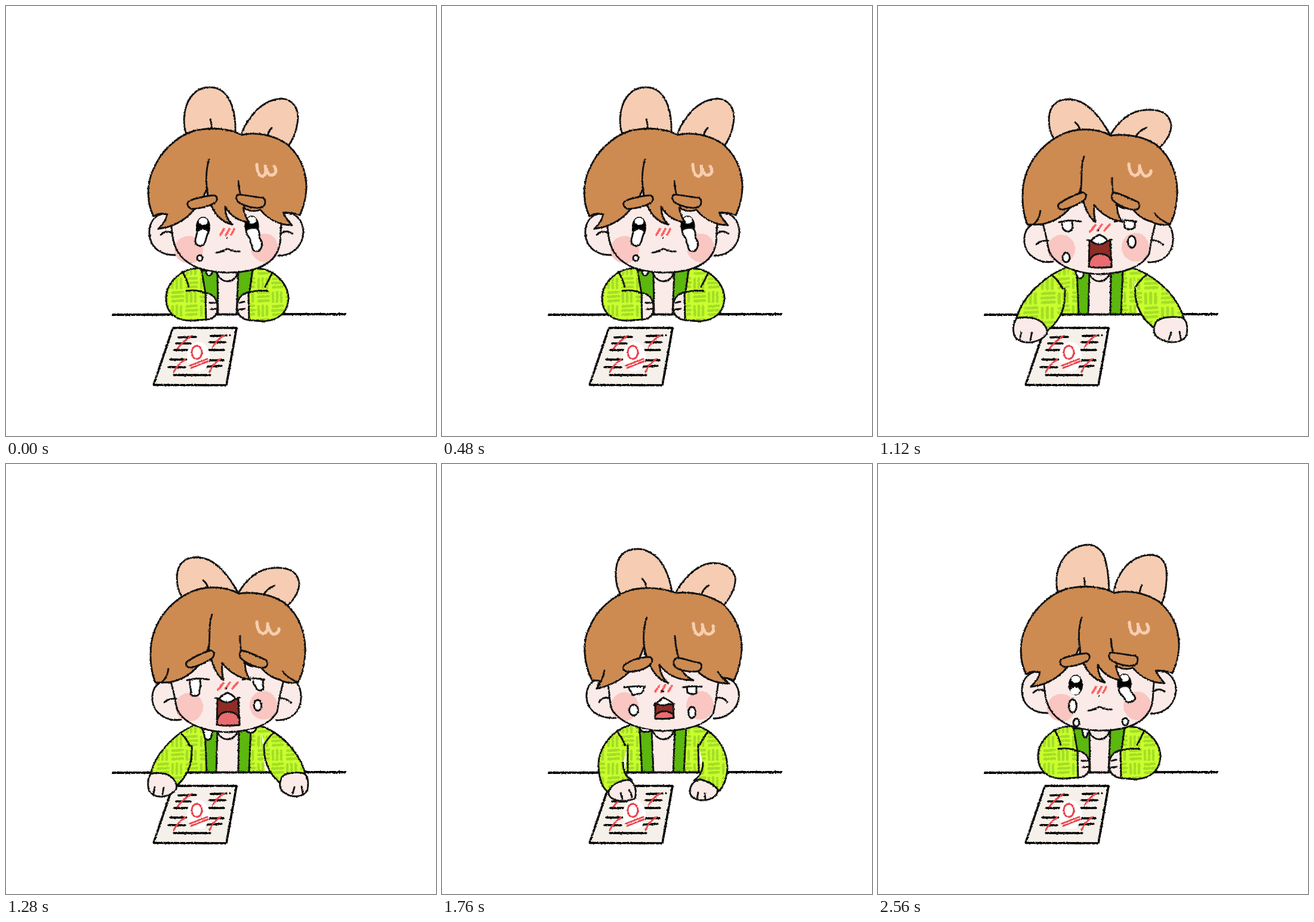
These frames come from a looping animation (720 by 720 pixels, 2.72 s). An HTML page:

```html
<!DOCTYPE html>
<html lang="en">
<head>
<meta charset="utf-8">
<title>Crying over a test</title>
<style>
html, body { margin: 0; width: 100%; height: 100%; overflow: hidden; background: #fff; }
svg { display: block; width: 100vw; height: 100vh; }
path, ellipse { vector-effect: non-scaling-stroke; stroke-linecap: round; stroke-linejoin: round; }
</style>
</head>
<body>
<svg id="stage" viewBox="0 0 720 720">
  <defs>
    <filter id="rough" filterUnits="userSpaceOnUse" x="0" y="0" width="720" height="720" color-interpolation-filters="sRGB">
      <feTurbulence type="fractalNoise" baseFrequency=".45" numOctaves="1" seed="4"/>
      <feDisplacementMap in="SourceGraphic" scale="3.2" xChannelSelector="R" yChannelSelector="G"/>
    </filter>
    <pattern id="weave" patternUnits="userSpaceOnUse" x="275" y="430" width="48" height="46">
      <rect width="48" height="46" fill="#caff2e"/>
      <path fill="none" stroke="#a3de26" stroke-width="4.4" d="M4 4l17-1M3 11l18-1M4 18l17-1M28 4v15M35 3v16M42 4v15M4 27v15M11 26v16M18 27v15M28 27l16-1M27 34l18-1M28 41l16-1"/>
    </pattern>
  </defs>
</svg>
<script>
const INK = '#111', SKIN = '#faebe8', HAIR = '#cd8b52', EAR = '#f6cdb3', BLUSH = '#f9c6c2',
      LAPEL = '#5cb70e', RED = '#e8434a', NOSE = '#ff5f60', WEAVE = 'url(#weave)';
const STEP = 160, ORDER = 'AEFACDGHDGHCAEFAE';

const path = (d, fill = 'none', stroke = INK, width = 2.9) =>
  `<path d="${d}" fill="${fill}" stroke="${stroke}" stroke-width="${width}"/>`;
const oval = (x, y, rx, ry, fill = '#fff', stroke = 'none', width = 2.9) =>
  `<ellipse cx="${x}" cy="${y}" rx="${rx}" ry="${ry}" fill="${fill}" stroke="${stroke}" stroke-width="${width}"/>`;
const drop = (x, y, rx, ry) => oval(x, y, rx, ry, '#fff', INK);
const group = (content, attrs = '') => `<g ${attrs}>${content}</g>`;
const lines = list => list.map(d => path(d)).join('');
const slashes = d => path(d, 'none', NOSE, 3.6);

const scenery =
  path('M179 517L568 515.8', 'none', '#000', 3.8) +
  path('M279.5 539L386 539 369 635 247 634.5Z', '#f5f0e9', '#000', 3.6) +
  path('M289 555L318 554M285 565L309 565M282 576L303 576M343 552.5L369 552M341 563L367 563M335 576L365 576M275 592L302 592M272 604.5L300 605M337 593.5L364 593M333 604L361 602.5M281 618L342 618M375 551v.1', 'none', '#000', 3.6) +
  oval(322, 587, 19, 25) +
  oval(319.5, 580, 8.5, 11, 'none', RED) +
  path('M308 602L337 591M310 606L338 595M287 574Q297 561 309 553M346 571Q355 557 366 551M281 613Q289 598 300 592M341 613Q345 600 359 591', 'none', RED);

const rabbitEars = (left, right, inner) => path(left, EAR) + path(right, EAR) + path(inner);

const ears = {
  A: rabbitEars('M302 215C297 200 297 183 302 167C309 147 323 136 341 136C359 136 371 147 378 166Q385 186 384 211',
    'M395 213C399 200 410 184 421 173C433 162 447 156 461 155C478 156 488 168 489 185Q488 212 473 234',
    'M342 190Q345 198 344 206M445 204Q440 209 438 217'),
  E: rabbitEars('M301 215C297 198 299 180 306 165C316 147 332 136 352 135C366 136 377 146 380 158Q386 180 387 211',
    'M395 213C398 195 408 178 418 168C430 157 445 152 457 152C474 153 481 163 483 178Q485 208 475 235',
    'M345 191Q347 198 346 206M442 203Q439 208 438 216'),
  C: rabbitEars('M299 218C291 205 289 185 293 167C298 149 311 142 328 142C345 143 361 154 370 169Q381 188 385 214',
    'M392 214C400 200 412 186 424 177C436 168 448 165 459 166C475 167 487 175 491 190Q493 210 472 237',
    'M335 192Q342 199 342 207M447 203Q438 208 435 217'),
  D: rabbitEars('M293 220C286 206 284 188 289 174C294 162 305 156 320 156C337 157 353 167 365 181Q376 193 389 216',
    'M389 216C396 204 408 190 421 182C434 175 447 173 460 174C478 175 489 184 491 200Q491 217 472 237',
    'M330 195Q337 200 338 208M449 204Q438 208 433 217')
};
ears.F = group(ears.E, 'transform="translate(-2 -2.5)"');

function head(p) {
  // Fills reach under the fringe so that no gap opens behind it.
  const sideEar = d => path(d + 'L370 385Z', SKIN, 'none') + path(d);
  return p.sideEars.map(sideEar).join('') +
    path(p.face + 'L450 300L300 300Z', SKIN, 'none') +
    p.blushes.map(b => oval(...b, BLUSH)).join('') +
    path(p.face) + path(p.folds) + p.eyes + path(p.hair, HAIR) + path(p.strands) +
    path(p.shine, 'none', '#f8ceb0', 5) + p.brows.map(d => path(d, HAIR)).join('');
}

const sadEye = (x, y) => oval(x, y, 12, 17, '#000') + oval(x, y - 9.5, 7.5, 6);
const sadLook = {
  sideEars: ['M270 349C253 345 239 360 240 381C241 405 260 418 285 417', 'M456 418C480 418 497 402 498 378C497 358 484 344 466 347'],
  face: 'M277 365C278 405 290 424 318 437C345 448 385 449 415 441C440 433 456 420 459 395L461 362',
  blushes: [[306, 408, 24, 23], [433, 405, 23, 24]],
  folds: 'M259 383Q267 375 279 380M479 381Q470 374 460 381',
  eyes: sadEye(330, 370) + sadEye(411.5, 368),
  hair: 'M247 352C236 330 235 300 246 275C258 245 285 218 315 209C345 202 375 205 394 216C420 210 450 217 470 231C492 250 503 275 503 305C502 325 497 340 492 350Q478 345 464 346Q470 358 479 367C458 367 438 357 426 341C414 346 405 342 397 338Q400 353 407 362Q380 359 367 336Q367 355 379 366Q350 360 338 319L337 305C325 335 300 368 255 373Q267 362 270 349Q258 345 247 352Z',
  strands: 'M340 257C334 275 335 300 338 320M389 293C390 311 394 325 400 340',
  shine: 'M420 265Q421 285 429 285Q437 284 434 268Q438 285 446 283Q456 280 449 268',
  brows: ['M306 327C315 322 335 318 347 317C355 318 355 326 349 330C338 336 325 339 312 340C304 338 302 331 306 327Z',
    'M388 316C395 315 415 320 430 321C436 324 435 335 428 337C415 340 400 335 390 329C384 324 385 319 388 316Z']
};
const sadMouth = slashes('M359 383L365 373M368 384L374 373M377 383L382 374') +
  oval(370, 388, 1.2, 1.2, INK) + path('M352 413Q362 412 371 406Q380 412 391 411');
const sadTears = {
  A: path('M320 378C326 370 338 372 339 380C335 384 336 390 333 396C330 404 318 403 317 394C316 388 320 386 320 378Z', '#fff') +
    path('M402 376C405 371 421 369 423 376C427 383 421 386 427 392C431 400 427 411 419 411C410 410 414 401 409 395C411 388 402 385 402 376Z', '#fff') +
    drop(324.5, 422, 4.5, 4.8) + path('M335 444Q336 452 341 451Q345 450 345 445', '#fff'),
  E: oval(330, 380, 8, 6.5) +
    path('M403 377C407 370 421 370 422 377C423 383 429 385 431 392C429 399 416 401 414 395C413 390 403 385 403 377Z', '#fff') +
    drop(326, 405, 6.5, 11) + drop(332, 433, 5, 6.5) + drop(414, 431.5, 5, 6) +
    path('M341 444C344 449 342 458 347 458C352 457 349 450 354 447', '#fff'),
  F: path('M320 378C326 371 338 371 340 379C338 387 328 391 321 386Q318 382 320 378Z', '#fff') +
    oval(411.5, 378, 8, 6.5) + drop(328, 418, 6, 8) + drop(420, 407, 6.5, 10) +
    path('M332 441Q333 452 339 451Q344 450 344 445', '#fff')
};

function torso(left, right) {
  return path('M316 440L427 440L434 516L306 516Z', WEAVE, 'none') + path('M306 516L434 516') +
    path(`M${left[0]} 443L${left[1]} 516L${right[1]} 516L${right[0]} 441Z`, LAPEL) +
    path(`M${left[2]} 445L${left[3]} 516L${right[3]} 516L${right[2]} 445Z`, SKIN) +
    path('M352 446Q359 461 371 461Q384 460 388 447');
}

const sadBody = torso([327, 336, 354, 355], [413, 406, 389, 386]) +
  path('M334 480C348 482 354 492 354 505C354 517 348 525 334 525Z', SKIN) +
  path('M407 479C392 482 387 492 387 505C388 517 394 525 408 526Z', SKIN) +
  path('M327 440C300 435 268 460 268 489C268 515 285 527 310 527L335 525L334 480L327 440Z', WEAVE, 'none') +
  path('M327 440C300 435 268 460 268 489C268 515 285 527 310 527L335 525L334 481Q320 474 302 477M327 440L334 481') +
  path('M413 440C445 436 473 463 473 490C471 515 455 527 430 528L407 526L407 478Z', WEAVE, 'none') +
  path('M413 440C445 436 473 463 473 490C471 515 455 527 430 528L407 526L406 480Q420 475 438 477M413 440L408 478') +
  lines(['M295 445Q302 455 306 470', 'M446 446Q440 459 434 470', 'M341 497L351 497M343 508L352 507M391 497L399 495M391 508L400 507']);

const wailLook = {
  sideEars: ['M265 364C250 366 244 380 245 395C247 418 270 432 293 428', 'M452 429C478 430 493 415 494 392C494 378 490 362 478 364'],
  face: 'M275 362C283 385 283 400 287 412C300 437 335 448 370 449C405 448 440 440 454 415C457 395 460 380 465 362',
  blushes: [[307, 407, 23, 24], [431, 404, 23, 24]],
  folds: 'M265 399Q272 392 285 393M478 400Q468 391 457 392',
  eyes: '',
  hair: 'M250 366C240 340 239 305 249 278C262 245 290 218 325 209C350 204 374 208 390 217C415 213 445 219 464 231C489 250 501 280 501 310C501 335 495 355 489 365Q472 369 458 361C445 358 431 349 425 336Q410 343 400 332Q400 350 409 361Q379 356 362 333Q361 350 364 362Q346 348 339 306C330 337 302 366 262 366Z',
  strands: 'M345 252C338 270 343 290 339 310M392 288C391 310 397 322 400 336M272 343Q270 358 260 366M463 347Q472 359 488 365',
  shine: 'M420 264Q421 282 430 284Q439 283 438 267Q441 285 449 285Q457 284 457 276',
  brows: ['M303 331C315 323 330 316 342 312C350 313 350 321 344 326C333 333 320 339 309 341C301 340 300 334 303 331Z',
    'M394 313C400 311 420 322 435 328C440 332 438 340 432 341C420 342 402 334 393 325C390 320 391 315 394 313Z']
};
const wailMouth = path('M354 394L389 393 391 437Q372 439 353 437Z', '#8f2c25') +
  path('M354 428Q358 414 373 415Q388 416 391 428L391 437Q372 439 353 437Z', '#e96c70') +
  path('M357 393Q362 386 371 383Q380 386 384 393Q378 399 370 399Q362 399 357 393Z', '#fff') +
  path('M351 392L357 393M384 393L391 391') +
  slashes('M355 378L364 367M367 376L375 366M379 376L388 366') + oval(369, 376, 1.4, 1.4, INK);
const wailLids = path('M303 362Q320 357 340 361M396 361Q415 357 433 361');
const wailTears = {
  D: path('M308 362C306 375 312 376 309 383C308 390 324 390 324 383C322 377 328 374 325 362', '#fff') +
    path('M414 363C413 371 419 371 420 377C424 381 432 379 431 373C429 369 431 366 430 362', '#fff') +
    drop(421.5, 404, 6.2, 9) +
    path('M329 445C334 450 329 461 338 462C346 461 343 453 346 448', '#fff') +
    path('M403 446C404 452 416 452 419 443', '#fff'),
  G: path('M309 362L309 372Q317 379 326 372L325 362', '#fff') +
    path('M411 362C411 374 417 378 417 386C420 393 431 390 430 382C427 376 431 370 430 362', '#fff') +
    drop(317, 402, 7, 10) + path('M330 444Q331 453 338 453Q344 452 344 447', '#fff') +
    path('M406 446C408 458 418 457 419 443', '#fff'),
  H: path('M308 362C308 374 312 377 318 378C325 377 327 370 325 362', '#fff') +
    path('M412 362L413 371Q421 377 430 371L430 362', '#fff') +
    drop(315, 421, 6, 8) + drop(425, 395, 6.5, 10) +
    path('M331 445Q333 457 339 456Q345 455 344 447', '#fff')
};

const leftArm = path('M314 438C285 450 250 483 242 520L284 540Q296 531 304 515Q311 500 311 475L318 440Z', WEAVE, 'none') +
  path('M314 438C285 450 250 483 242 520M292 450Q301 458 308 472M311 472Q312 500 304 515Q296 531 285 539') +
  path('M242 519C236 530 236 548 245 553C256 560 275 558 285 544C288 532 276 519 262 518Q250 516 242 519Z', SKIN) +
  path('M247 552L249 541M262 553L264 542');
const rightArm = path('M424 438C455 447 490 478 501 518L460 536Q445 524 436 505Q430 490 434 470Z', WEAVE, 'none') +
  path('M424 438C455 447 490 478 501 518M449 449Q440 457 432 470M432 472Q431 500 447 522L460 536') +
  path('M462 524C457 535 457 546 467 551C480 560 500 558 505 545C507 532 505 522 499 518C485 515 468 517 462 524Z', SKIN) +
  path('M480 552L483 541M497 552L495 540');
const stretch = (content, x, sx, sy) =>
  group(content, `transform="translate(${x} 450) scale(${sx} ${sy}) translate(${-x} -450)"`);
const wailBody = (sx, sy) => torso([333, 336, 354, 352], [410, 407, 390, 389]) +
  stretch(leftArm, 300, sx, sy) + stretch(rightArm, 440, sx, sy);

const sobLook = {
  ...wailLook,
  sideEars: ['M262 360C246 364 241 378 242 392C244 414 265 427 291 425', 'M455 426C475 427 494 412 497 392C498 380 494 364 480 360'],
  face: 'M277 365C282 385 279 400 285 412C300 435 335 446 370 447C405 446 440 440 454 418C459 400 460 380 463 365',
  blushes: [[306, 406, 23, 24], [432, 404, 23, 24]],
  folds: 'M263 399Q268 389 281 392M478 399Q470 389 460 392',
  hair: 'M251 362C238 335 234 300 246 276C258 245 287 218 320 210C347 205 374 209 392 216C418 213 446 219 468 233C490 251 502 280 502 308C501 333 495 350 489 362Q478 358 471 358L481 368C460 367 440 360 427 346Q413 351 400 342Q405 355 421 362Q384 363 364 336Q366 357 379 367Q348 357 338 304C330 340 300 368 259 376L264 363Z',
  strands: 'M343 257C336 275 337 300 340 320M390 288C391 310 396 325 402 342M272 346Q269 362 259 376M462 348Q469 360 480 367',
  shine: 'M421 267Q422 285 430 286Q438 285 436 269Q440 286 447 285Q457 283 454 271',
  brows: ['M305 337C315 328 335 323 348 323C355 327 352 334 345 339C335 346 322 348 310 348C302 345 302 341 305 337Z',
    'M392 325C400 323 420 332 432 333C437 337 434 345 429 347C415 349 400 346 392 341C386 336 387 328 392 325Z']
};
const sobFace = path('M357 401L387 401 388 425Q372 428 357 426Z', '#8f2c25') +
  path('M358 419Q372 409 387 419L388 425Q372 428 357 426Z', '#e96c70') +
  path('M355 403Q365 397 370 391Q378 394 389 402L379 402Q370 406 361 402Z', '#fff') +
  slashes('M357 381L364 371M367 382L374 370M379 381L385 371') + path('M368 380L370 381') +
  path('M313 374C313 382 319 380 318 386C323 390 325 383 331 385Q338 382 338 374', '#fff') +
  path('M410 374L411 383Q418 387 426 384L426 374', '#fff') +
  path('M305 374Q322 371 340 373M403 374Q418 371 435 373') +
  drop(321, 412, 7.5, 9) + drop(418.5, 416, 6, 9.5) +
  path('M331 443Q335 450 342 448Q350 449 348 445', '#fff');
const sobBody = torso([331, 335, 351, 354], [409, 405, 390, 387]) +
  path('M314 438C285 445 262 475 262 505C263 530 270 545 280 550L318 529Q304 518 304 498L312 470L318 440Z', WEAVE, 'none') +
  path('M314 438C285 445 262 475 262 505C263 530 270 545 280 550M318 529Q303 522 303 500M311 470L311 516M293 447Q301 458 307 471') +
  path('M424 438C455 445 478 475 478 510C476 530 470 542 463 548L422 530Q435 520 436 498L430 470Z', WEAVE, 'none') +
  path('M424 438C455 445 478 475 478 510C476 530 470 542 463 548M422 530Q437 520 437 500M429 470L430 516M446 447Q439 456 431 471') +
  path('M279 548C284 536 300 529 313 529C325 535 326 550 323 560C312 565 295 566 285 560Q277 555 279 548Z', SKIN) +
  path('M462 545C462 556 450 563 437 563C425 563 415 558 415 548C416 537 422 530 432 528Q451 532 462 545Z', SKIN) +
  lines(['M302 561L299 551M318 558Q317 550 313 546', 'M427 560L429 550M441 561L440 551']);

const sad = (key, shift) => sadBody + ears[key] +
  group(head(sadLook), `transform="translate(${shift} 0)"`) + sadMouth + sadTears[key];
const wail = (key, sx, sy) => wailBody(sx, sy) + ears.D + head(wailLook) + wailMouth + wailTears[key] + wailLids;
const poses = {
  A: sad('A', 0), E: sad('E', 1), F: sad('F', 1),
  C: sobBody + ears.C + head(sobLook) + sobFace,
  D: wail('D', 1, 1), G: wail('G', 1.12, 1.03), H: wail('H', 1.18, 1.06)
};

const stage = document.getElementById('stage');
stage.insertAdjacentHTML('beforeend', group(scenery, 'filter="url(#rough)"') +
  Object.entries(poses).map(([key, content]) =>
    group(content, `id="pose${key}" filter="url(#rough)" display="none"`)).join(''));

let shown = null;
function show(time) {
  const key = ORDER[Math.floor(time / STEP) % ORDER.length];
  if (key !== shown) {
    if (shown) document.getElementById('pose' + shown).setAttribute('display', 'none');
    document.getElementById('pose' + key).removeAttribute('display');
    shown = key;
  }
}
const start = performance.now();
function tick() {
  show(performance.now() - start);
  requestAnimationFrame(tick);
}
tick();
</script>
</body>
</html>
```
